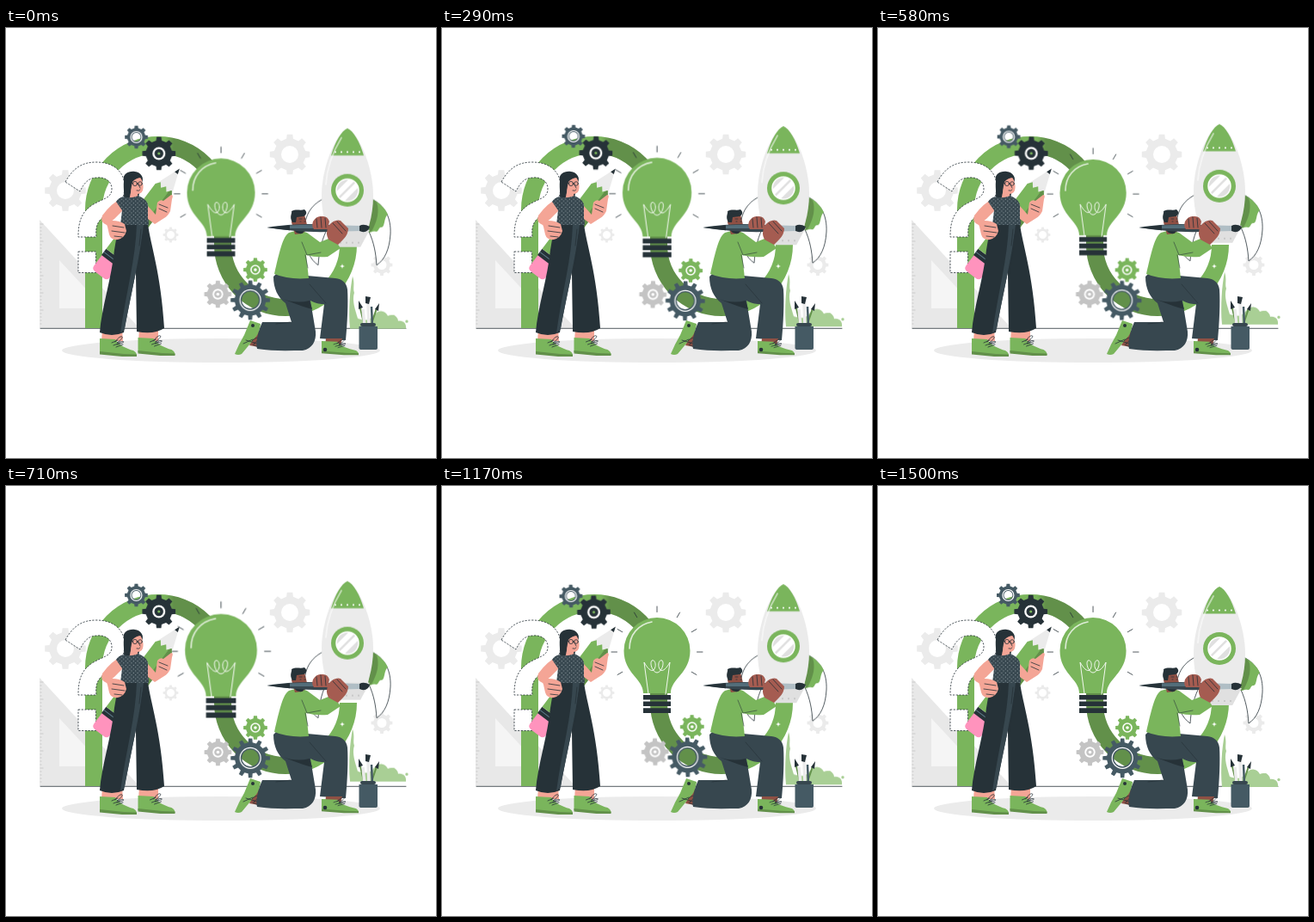
Recreate the animation shown at these times as an HTML page. Size 500x500 px, loop 1540 ms.

```html
<!DOCTYPE html>
<html lang="en">
<head>
<meta charset="utf-8">
<title>Ideas taking off</title>
<style>
html, body { margin: 0; width: 100%; height: 100%; overflow: hidden; background: #fff; }
svg { display: block; width: 100vw; height: 100vh; }
.g { fill: #7ab55c; }
.gd { fill: #62904a; }
.k { fill: #263238; }
.s { fill: #37474f; }
.l { fill: #ebebeb; }
.w { fill: #fff; }
.skin { fill: #f4a596; }
.brown { fill: #8f5044; }
.hand { fill: #a55c51; }
.line { fill: none; stroke: #263238; stroke-width: .8; stroke-linecap: round; stroke-linejoin: round; }
.white { fill: none; stroke: #fff; stroke-linecap: round; }
#cogs, #bulb, #rocket { animation: 1540ms linear -40ms infinite; }
#cogs { animation-name: sway; transform-origin: 221.5px 226.5px; }
#bulb { animation-name: beat; transform-origin: 250px 201.5px; }
#rocket { animation-name: lift; }
@keyframes sway { 25% { transform: rotate(1deg); } 75% { transform: rotate(-1deg); } }
@keyframes beat {
  0%, 30%, 40%, 60%, 100% { transform: scale(1); }
  10%, 50% { transform: scale(1.1); }
}
@keyframes lift { 50% { transform: translateY(-6.5px); } }
</style>
</head>
<body>
<svg viewBox="0 0 500 500">
  <defs>
    <linearGradient id="fold" gradientUnits="userSpaceOnUse" x1="0" x2="500" y1="0" y2="0">
      <stop offset=".37" stop-color="#7ab55c"/><stop offset=".39" stop-color="#62904a"/>
      <stop offset=".65" stop-color="#62904a"/><stop offset=".71" stop-color="#7ab55c"/>
    </linearGradient>
    <pattern id="dots" width="4.600" height="4.600" patternUnits="userSpaceOnUse">
      <rect width="5" height="5" fill="#37474f"/>
      <circle cx="1.2" cy="1.2" r=".5" fill="#cfd8dc"/><circle cx="3.5" cy="3.5" r=".5" fill="#cfd8dc"/>
    </pattern>
    <clipPath id="hole"><circle cx="397" cy="189" r="13"/></clipPath>
    <g id="shoe">
      <path class="g" d="M0 0L18 1C23 8 31 12 39 14Q43 16 43 20L26 20L0 17Z"/>
      <path class="gd" d="M0 15L28 18L43 18.500V21L26 21L0 18.500Z"/>
      <path class="line" d="M14 5L21 2M16 8L24 5M19 10L27 7M18 4C24 -6 32 -3 20 5C28 2 33 4 20 7"/>
    </g>
  </defs>

  <g id="back">
    <ellipse class="l" cx="250" cy="375" rx="185" ry="14"/>
    <path d="M39 223L155 349H39Z" fill="#e8e8e8"/>
    <path d="M62 270V326H114Z" fill="#f5f5f5"/>
    <path id="ticks" fill="none" stroke="#bdbdbd" stroke-width=".7"/>
  </g>
  <path class="line" d="M40 349.300H465" stroke-width=".6"/>
  <path d="M102 349V211A75 75 0 0 1 252 211V252A73 73 0 0 0 398 252" fill="none" stroke="url(#fold)" stroke-width="20"/>
  <path class="w" d="M391 274l.7 2.300 2.300.7-2.300.7-.7 2.300-.7-2.300-2.300-.7 2.300-.7z"/>

  <g class="w" stroke="#263238" stroke-width=".8" stroke-dasharray="2.200 1.500">
    <path d="M69 179C78 163 88 156 105 156C127 156 138 169 138 184C138 202 128 209 118 216C106 224 104 230 105 243H84C84 225 88 214 100 206C113 198 123 198 123 187C123 178 115 173 106 174C96 174 91 180 86 190Z"/>
    <path d="M84 260H104.500V284.500H84Z"/>
  </g>

  <g id="cogs"></g>

  <g id="bulb">
    <path class="g" d="M234 241C234 224 211.500 218 211.500 191.500A38.500 38.500 0 0 1 288.500 191.500C288.500 218 266 224 266 241Z"/>
    <path class="white" stroke-width="1.600" opacity=".75" d="M218 189C218 173 228 161 244 158"/>
    <path class="white" stroke-width=".9" d="M240 242L235 205C239 212 243 216 246 214C250 210 248 201 244 203C241 206 245 217 250 217C255 217 259 206 256 203C252 201 250 210 254 214C257 216 261 212 265 205L260 242"/>
    <path class="k" d="M234 243h32v5.500h-32zM234 250.500h32v5.500h-32zM234 258.200h32v5.800h-32z"/>
    <path id="rays" class="line"/>
  </g>

  <g id="rocket">
    <path d="M400 350C398 328 400 304 403 289C406 297 403 304 405 308C402 317 406 328 409 338C416 340 422 342 428 334C434 327 441 329 444 335C450 332 456 336 456 341C462 340 466 344 465 350Z" fill="#a9cf95"/>
    <circle cx="450" cy="337" r="3" fill="#a9cf95"/><circle cx="466" cy="341.500" r="1.700" fill="#a9cf95"/>
    <g id="fin">
      <path class="w" d="M425 199C440 206 448 220 447 240C446 258 440 270 431 276C430 262 428 250 422 237Z"/>
      <path class="line" d="M425 199C440 206 448 220 447 240C446 258 440 270 431 276C430 262 428 250 422 237"/>
    </g>
    <use href="#fin" transform="matrix(-1 0 0 1 794 0)"/>
    <path class="g" d="M425 199C436 204 441 211 444 217C439 221 441 231 437 232C433 231 434 237 430 237C426 236 425 238 421 238Z"/>
    <path class="gd" d="M425 199L431 203Q436 217 425 237L421 238Z"/>
    <path class="l" d="M397 117C411 123 427 163 427 195C427 220 420 240 412 255H382C374 240 367 220 367 195C367 163 383 123 397 117Z"/>
    <path d="M371 235H423L412 255H382Z" fill="#e0e0e0"/>
    <path class="g" d="M397 117C404 120 411 132 416 148.500H378C383 132 390 120 397 117Z"/>
    <path class="white" stroke-width="2" opacity=".5" d="M390 128C379 146 373 166 372 182"/>
    <path class="white" stroke-width="2.200" stroke-dasharray="0 7" d="M383 144.500H413"/>
    <path fill="none" stroke="#aaa" stroke-width="1.600" stroke-linecap="round" stroke-dasharray="0 7" d="M389 250H412"/>
    <circle class="g" cx="397" cy="189" r="19"/>
    <circle cx="397" cy="189" r="13" fill="#e0e0e0"/>
    <path clip-path="url(#hole)" d="M380 199L407 172M386 205L413 178" stroke="#fff" stroke-width="6"/>
    <circle cx="397" cy="189" r="13" fill="none" stroke="#fff" stroke-width="1.500"/>
  </g>

  <g id="pots">
    <path d="M417 347L412 326M424 347L431 326" fill="none" stroke="#62904a" stroke-width="2"/>
    <path d="M417 347L415 327M422 347L421 320" stroke="#ebebeb" stroke-width="3.500"/>
    <path d="M426 347L425 324" stroke="#455a64" stroke-width="2.500"/>
    <path class="k" d="M410 327L410 317L415 325ZM418 320L418 312L424 313L422 321ZM429 327L434 320L433 329Z"/>
    <path d="M410.500 347H432V372Q432 374 429 374H413.500Q410.500 374 410.500 372Z" fill="#455a64"/>
    <rect class="s" x="412" y="343" width="18" height="4" rx="2"/>
  </g>

  <g id="man">
    <path class="brown" d="M289 356L302 347L299 372L283 369Z"/>
    <path class="g" d="M284 340L296 344Q295 355 289 361L274 379Q270 381 266 379Q271 367 277 357Z"/>
    <circle class="k" cx="287" cy="346" r="2"/>
    <path class="line" d="M276 367L287 362M279 363L289 366M286 364C292 357 298 361 288 367C296 365 296 374 287 368"/>
    <path class="s" d="M311 289C311 303 316 313 325 320L332 342L298 342C293 353 290 366 292 373C310 376 329 375 345 375C356 373 361 364 360 353L354 317C361 321 367 321 370 321L365 361L395 363C397 343 398 319 397 304C396 296 391 292 383 291L350 288L314 286Z"/>
    <path class="k" d="M322 315Q337 321 353 317L356 327Q344 324 322 315Z"/>
    <path class="line" d="M331 342L314 344M353 298L372 320" opacity=".8"/>
    <path class="brown" d="M372 361H391L389 369H371Z"/>
    <use href="#shoe" transform="translate(367 364) scale(1 .77)"/>
    <circle class="k" cx="371" cy="374" r="2.300"/>
    <path class="g" d="M329 238C322 242 318 260 312 286Q329 293 352 291L349 264Q360 267 374 266L389 256L380 243L365 249L350 238Q340 234 329 238Z"/>
    <path class="line" d="M344 249L350 264L366 261M348 264L351 279" opacity=".7"/>
    <path class="brown" d="M334 217H347Q349 224 350 229Q349 237 344 239L336 240L332 226Z"/>
    <path class="k" d="M333 226C329 219 333 216 332 213C338 210 342 213 347 211C351 214 349 218 346 219L338 220L337 226Z"/>
    <path class="k" d="M335 232L339 235L347 234Q347 240 341 239Q335 238 335 232Z"/>
    <path class="line" d="M341 222H344M347 222H348M342 225H343M347 225H348"/>
    <path class="s" d="M303.500 232Q340 226 376 229V237Q340 238 303.500 232Z"/>
    <path d="M330 229.500Q355 228 376 229.500V233H330Z" fill="#546e7a"/>
    <path class="k" d="M303.500 232L330 229.500V235.300Z"/>
    <path d="M376 229L412 230V236L376 237Z" fill="#b0bec5"/>
    <path class="k" d="M411 230Q416 227 423 231Q421 238 414 237L411 236Z"/>
    <path class="hand" d="M357 225Q361 218 367 219Q374 218 376 225L374 234H358Q355 231 357 225ZM375 230Q382 222 389 224L398 233Q398 240 392 246L386 252L375 246Q371 239 375 230Z"/>
    <path class="line" d="M361 222L362 232M366 220L367 232M371 221L372 232M380 227L391 239M385 225L395 236" stroke="#633629"/>
  </g>

  <g id="woman">
    <path class="skin" d="M112 350H135L136 364H111ZM155 350H177L177 364H154Z"/>
    <use href="#shoe" transform="translate(109 361)"/>
    <use href="#shoe" transform="translate(153.500 360)"/>
    <g transform="translate(111 284) rotate(37)">
      <path d="M-11.500 -17H11.500V-1Q11.500 4 6 4H-6Q-11.500 4 -11.500 -1Z" fill="#ff93bd"/>
      <rect class="k" x="-12" y="-25" width="24" height="9"/>
      <path d="M-12 -20.500H12" stroke="#607d8b"/>
      <path class="l" d="M-11.500 -120L0 -151L11.500 -120Z"/>
      <path class="k" d="M-2.300 -144.500L0 -151L2.300 -144.500Z"/>
      <path class="g" d="M-12 -25V-120L-8 -125L-4 -120L0 -125L4 -120L8 -125L12 -120V-25Z"/>
      <path class="gd" d="M6 -25V-122L8 -125L12 -120V-25Z"/>
    </g>
    <path class="k" d="M144 228H165C168 252 180 284 184 349Q172 357 152 353L151 285Z"/>
    <path class="k" d="M131 228H160C157 260 146 306 137 354Q123 360 109 354C111 326 123 290 126 258Z"/>
    <path class="s" d="M152 228H160C157 260 146 306 138 350L133 355C139 310 151 268 152 228Z"/>
    <path class="line" d="M157 234L155 253M159 240L153 290" stroke="#607d8b"/>
    <path class="k" d="M137 178C135 169 143 166 150 167C157 168 161 174 158 180L154 197Q146 206 135 204C139 194 136 188 137 178Z"/>
    <path class="skin" d="M146 176L155 172Q160 179 159.500 186Q159 193 153 193L154 200L142 200L145 191Z"/>
    <path class="k" d="M142 173Q150 166 158 174Q151 174 147 179L145 188L144 197L138 196Z"/>
    <path class="line" d="M145 180L148 181M152 181H154" stroke="#d9574f"/>
    <circle class="line" cx="150" cy="181" r="2.600" stroke="#d9574f"/>
    <circle class="line" cx="156" cy="181" r="2.300" stroke="#d9574f"/>
    <path class="line" d="M152 189Q155 190 156 188M154 182L156 186" stroke="#b5473c"/>
    <path class="skin" d="M134 199Q123 203 112 218Q109 226 117 229L126 222L135 213Z"/>
    <path d="M137 196Q143 199 154 195Q163 199 165 205L166 229H133L135 212L128 202Q131 197 137 196Z" fill="url(#dots)"/>
    <path class="skin" d="M113 219L124 224Q132 224 138 228L140 236Q138 244 130 246Q122 247 120 240L118 231Z"/>
    <path class="line" d="M124 230L137 232M123 236L138 238M126 242L135 243" stroke="#b5605a"/>
    <path class="skin" d="M165 207L174 217L176 203Q179 199 183 201L192 194Q195 194 193 199L191 213Q188 219 184 221L173 228L165 222Z"/>
    <path class="line" d="M178 205L188 209M178 210L187 214" stroke="#b5605a"/>
  </g>
</svg>
<script>
const $ = id => document.getElementById(id);
const polar = (r, a) => (r * Math.cos(a)).toFixed(2) + ' ' + (r * Math.sin(a)).toFixed(2);

// Toothed wheel with a round opening
function cogPath(r, teeth, hole) {
  const step = 2 * Math.PI / teeth, pts = [];
  for (let i = 0; i < teeth; i++) {
    const a = i * step - Math.PI / 2;
    pts.push(polar(r * .79, a - step * .27), polar(r, a - step * .18),
             polar(r, a + step * .18), polar(r * .79, a + step * .27));
  }
  return `M${pts.join('L')}ZM${hole} 0A${hole} ${hole} 0 1 0 ${-hole} 0A${hole} ${hole} 0 1 0 ${hole} 0Z`;
}

function cog(parent, x, y, r, teeth, hole, fill, rings = []) {
  const hub = rings.map(([rad, color, width]) => width
    ? `<circle r="${rad}" fill="none" stroke="${color}" stroke-width="${width}"/>`
    : `<circle r="${rad}" fill="${color}"/>`).join('');
  $(parent).insertAdjacentHTML('beforeend', `<g transform="translate(${x} ${y})">
    <path d="${cogPath(r, teeth, hole)}" fill="${fill}" fill-rule="evenodd"/>${hub}</g>`);
}

const pale = '#ebebeb', dark = '#263238', slate = '#455a64', grey = '#c4c4c4', green = '#7ab55c';
cog('back', 330, 147, 23.5, 8, 10, pale);
cog('back', 69, 189, 24, 8, 10, pale);
cog('back', 191.5, 240.5, 9, 8, 4.5, pale);
cog('back', 437, 275.5, 12.5, 8, 5.5, pale);

cog('cogs', 151.4, 127, 13.5, 8, 5, slate, [[6.5, '#fff', 1.2]]);
cog('cogs', 177.7, 146, 19.5, 8, 4, dark, [[7.5, '#fff'], [5.2, dark], [1.6, green]]);
cog('cogs', 246.5, 309.5, 16, 8, 4, grey, [[6.2, '#fff'], [4.3, grey], [1.8, '#fff']]);
cog('cogs', 290, 281, 14, 8, 4, green, [[5.8, '#fff'], [4.2, green], [1.8, '#fff']]);
cog('cogs', 284.2, 316.3, 23, 12, 10, slate, [[12, '#fff', 1.2]]);

let rays = '';
for (let deg = -210; deg <= 30; deg += 30) {
  const a = deg * Math.PI / 180, at = r => `${250 + r * Math.cos(a)} ${193 + r * Math.sin(a)}`;
  rays += `M${at(46.5)}L${at(53)}`;
}
$('rays').setAttribute('d', rays);

let ticks = '';
for (let i = 0; i < 30; i++) ticks += `M39.500 ${228 + i * 4}h${i % 5 ? 2 : 4}`;
$('ticks').setAttribute('d', ticks);
</script>
</body>
</html>
```
